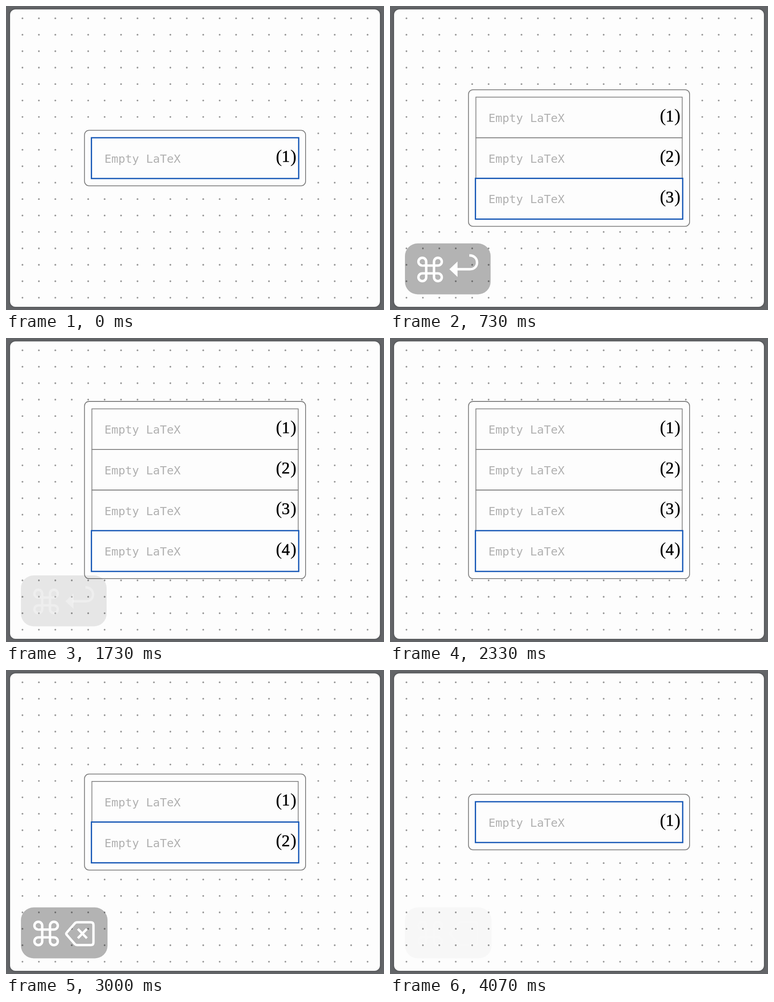
These frames come from a looping animation (834 by 671 pixels, 4.4 s). An HTML page with a canvas:

```html
<!DOCTYPE html>
<html lang="en">
<head>
<meta charset="utf-8">
<title>Equation rows</title>
<style>
  html, body { margin: 0; width: 100%; height: 100%; overflow: hidden; background: #636568; }
  canvas { display: block; width: 834px; height: 671px; }
</style>
</head>
<body>
<canvas id="stage" width="834" height="671"></canvas>
<script>
const ctx = document.getElementById('stage').getContext('2d');
const LOOP = 4400;
const PAPER = '#fdfdfd';
const ROW = 89.6, MID = 335.6;

// [start ms, value]: each value holds until the next entry
const ROWS = [[0, 1], [70, 2], [670, 3], [1270, 4], [2400, 3], [3000, 2], [3530, 1]];
const OPACITY = [
  [0, 0], [70, 1], [530, .52], [600, .15], [670, 1], [1130, .5], [1200, 0],
  [1270, 1], [1730, .31], [1800, 0], [2400, 1], [2870, .5], [2930, .15],
  [3000, 1], [3470, .5], [3530, 1], [4000, .45], [4070, .075]
];

function valueAt(track, t) {
  let value = track[0][1];
  for (const [start, v] of track) if (t >= start) value = v;
  return value;
}

function roundRect(x, y, w, h, r) {
  ctx.beginPath();
  ctx.roundRect(x, y, w, h, r);
}

function line(x1, y1, x2, y2) {
  ctx.beginPath();
  ctx.moveTo(x1, y1);
  ctx.lineTo(x2, y2);
  ctx.stroke();
}

function drawPaper() {
  ctx.fillStyle = '#636568';
  ctx.fillRect(0, 0, 834, 671);
  ctx.save();
  ctx.shadowColor = 'rgba(0,0,0,.3)';
  ctx.shadowBlur = 5;
  ctx.fillStyle = PAPER;
  roundRect(9, 7.5, 816, 656.5, 12);
  ctx.fill();
  ctx.restore();

  ctx.fillStyle = '#979797';
  for (let i = 0; i < 22; i++) {
    for (let j = 0; j < 18; j++) {
      ctx.beginPath();
      ctx.arc(36.3 + i * 36.26, 27.2 + j * 36.27, 1.9, 0, Math.PI * 2);
      ctx.fill();
    }
  }
}

function drawNumber(n, y) {
  ctx.fillStyle = ctx.strokeStyle = '#000';
  ctx.lineWidth = .7;
  ctx.font = '41px "Liberation Serif", serif';
  ctx.fillText('(', 595.3, y + 9);
  ctx.fillText(')', 627.3, y + 9);
  ctx.font = '36px "Liberation Serif", serif';
  ctx.textAlign = 'center';
  ctx.fillText(n, 617.3, y + 8.6);
  ctx.strokeText(n, 617.3, y + 8.6);
  ctx.textAlign = 'left';
}

function drawTable(rows) {
  const top = MID - rows * ROW / 2;
  const last = top + (rows - 1) * ROW;

  ctx.fillStyle = PAPER;
  ctx.strokeStyle = '#7c7c7c';
  ctx.lineWidth = 1.8;
  roundRect(173.2, top - 16.4, 487.8, rows * ROW + 32.8, 10);
  ctx.fill();
  ctx.stroke();

  ctx.strokeStyle = '#858585';
  for (let i = 0; i < rows - 1; i++) ctx.strokeRect(189.5, top + i * ROW, 455.2, ROW);

  for (let i = 0; i < rows; i++) {
    const y = top + (i + .5) * ROW;
    ctx.fillStyle = '#b0b0b0';
    ctx.font = '25.4px "DejaVu Sans Mono", monospace';
    ctx.fillText('Empty LaTeX', 217.2, y + 10.2);
    drawNumber(i + 1, y);
  }

  ctx.strokeStyle = '#1859b7';
  ctx.lineWidth = 2.8;
  ctx.strokeRect(188.5, last, 457.3, ROW + .4);
}

function drawCommand() {
  const r = 8.6, c = r * 2;
  ctx.lineWidth = 5.4;
  ctx.save();
  ctx.translate(88.5, 581.5);
  ctx.beginPath();
  [[c, c], [-c, c], [-c, -c], [c, -c]].forEach(([x, y], i) => {
    const start = Math.PI * (1 - 1.5 * i);
    ctx.arc(x, y, r, start, start - 1.5 * Math.PI, true);
  });
  ctx.closePath();
  ctx.stroke();
  ctx.restore();
}

function drawReturn() {
  ctx.lineWidth = 5.4;
  ctx.stroke(new Path2D('M175 550.5C186 550.5 192 557.5 192 566C192 575 186 581 176 581H147'));
  ctx.fill(new Path2D('M131 581L149 564V598Z'));
}

function drawDelete() {
  ctx.lineWidth = 5.2;
  ctx.stroke(new Path2D('M157 556.8H187Q193 556.8 193 562.8V601.2Q193 607.2 187 607.2H157Q154 607.2 152 605L134.5 585Q131.5 582 134.5 579L152 559Q154 556.8 157 556.8Z'));
  line(158.5, 571.5, 178.5, 592);
  line(178.5, 571.5, 158.5, 592);
}

function drawKeys(opacity, deleting) {
  if (!opacity) return;
  ctx.save();
  ctx.globalAlpha = opacity;
  ctx.fillStyle = 'rgba(0,0,0,.295)';
  roundRect(33, 524, deleting ? 191 : 189, 112.5, 28);
  ctx.fill();
  ctx.fillStyle = ctx.strokeStyle = '#fff';
  drawCommand();
  if (deleting) drawDelete();
  else drawReturn();
  ctx.restore();
}

function render(now) {
  const t = now % LOOP;
  drawPaper();
  drawTable(valueAt(ROWS, t));
  drawKeys(valueAt(OPACITY, t), t >= 2300);
}

const origin = performance.now();
function tick() {
  render(performance.now() - origin);
  requestAnimationFrame(tick);
}
tick();
</script>
</body>
</html>
```
